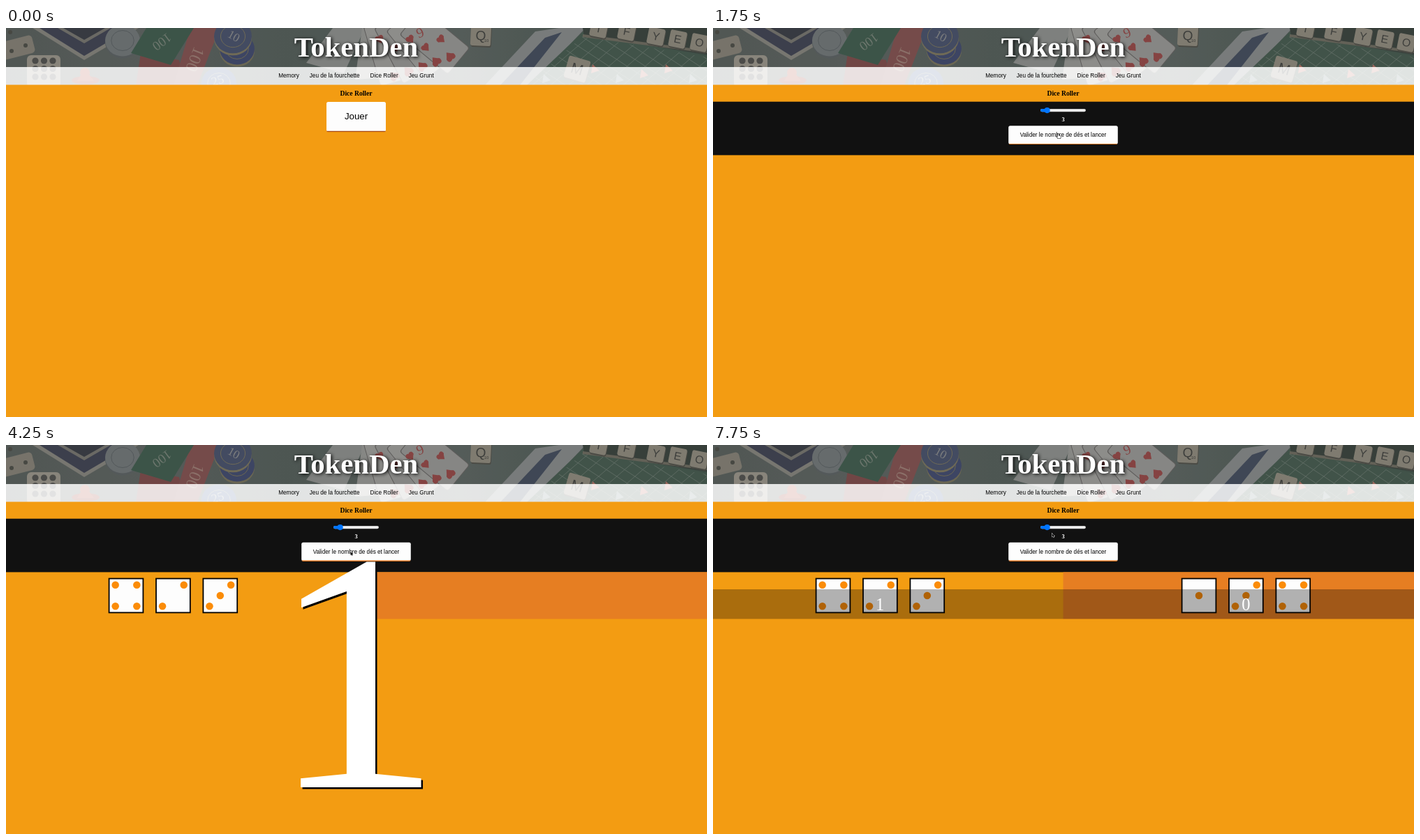
Recreate the animation shown at these times as an HTML page with a canvas. Size 1004x558 px, loop 8000 ms.

```html
<!DOCTYPE html>
<html lang="fr">
<head>
<meta charset="utf-8">
<title>Dice Roller</title>
<style>
html, body { margin: 0; width: 100%; height: 100%; overflow: hidden; background: #f39c12; }
canvas { display: block; }
</style>
</head>
<body>
<canvas id="stage" width="1004" height="558"></canvas>
<script>
const W = 1004, H = 558, LOOP = 8000, MID = 501.5;
const SERIF = '"Liberation Serif", serif', SANS = '"Liberation Sans", sans-serif';
const screen = document.getElementById('stage').getContext('2d');
let c = screen;

function rect(x, y, w, h, fill) {
  c.fillStyle = fill;
  c.fillRect(x, y, w, h);
}
function round(x, y, w, h, r, fill) {
  c.fillStyle = fill;
  c.beginPath();
  c.roundRect(x, y, w, h, r);
  c.fill();
}
function disc(x, y, r, fill, ry = r, turn = 0) {
  c.fillStyle = fill;
  c.beginPath();
  c.ellipse(x, y, r, ry, turn, 0, 7);
  c.fill();
}
function poly(fill, ...p) {
  c.fillStyle = fill;
  c.beginPath();
  for (let i = 0; i < p.length; i += 2) c.lineTo(p[i], p[i + 1]);
  c.closePath();
  c.fill();
}
function text(s, x, y, font, fill) {
  c.font = font;
  c.fillStyle = fill;
  c.textAlign = 'center';
  c.fillText(s, x, y);
}
function at(x, y, turn, draw) {
  c.save();
  c.translate(x, y);
  c.rotate(turn);
  draw();
  c.restore();
}

// Banner: board games on a table, in flat tones
function tile(s, x, y, size, turn) {
  at(x, y, turn, () => {
    round(-size / 2 + 1, -size / 2 + 2, size, size, 3, '#4b4a42');
    round(-size / 2, -size / 2, size, size, 3, '#908b7c');
    text(s, 0, size * .22, `${size * .66}px ${SANS}`, '#393a37');
  });
}
function heart(x, y, s, turn) {
  at(x, y, turn, () => {
    disc(-s * .45, -s * .3, s * .55, '#98403f');
    disc(s * .45, -s * .3, s * .55, '#98403f');
    poly('#98403f', -s, -.1 * s, s, -.1 * s, 0, s * 1.1);
  });
}
function chip(x, y, r, fill, rim) {
  disc(x, y + 3, r, rim, r * .9);
  disc(x, y, r, fill, r * .9);
  c.strokeStyle = rim;
  c.lineWidth = 1;
  c.beginPath();
  c.ellipse(x, y, r * .65, r * .58, 0, 0, 7);
  c.stroke();
}
function photo() {
  const g = c.createLinearGradient(0, 0, W, 0);
  g.addColorStop(0, '#525a56');
  g.addColorStop(.2, '#59605d');
  g.addColorStop(.4, '#4d5954');
  g.addColorStop(.65, '#57615d');
  g.addColorStop(1, '#3a4d43');
  rect(0, 0, W, 82, g);

  at(16, 28, -.25, () => round(-30, -13, 54, 26, 5, '#858074'));
  disc(6, 6, 3, '#45463f');
  disc(8, 33, 3, '#45463f');
  disc(28, 25, 3, '#45463f');
  poly('#85847c', 38, 0, 190, 0, 112, 46);
  poly('#363a4c', 48, 0, 180, 0, 112, 40);
  poly('#74736c', 74, 0, 150, 0, 112, 22);
  poly('#30343d', 82, 0, 142, 0, 112, 17);
  round(30, 39, 48, 46, 6, '#9c978a');
  for (let i = 0; i < 9; i++) disc(42 + i % 3 * 12.5, 47 + (i / 3 | 0) * 11.5, 4.6, '#4a4b48');
  disc(114, 75, 20, '#8f3526', 6);
  disc(113, 64, 7, '#a8402d');
  poly('#a8402d', 109, 64, 117, 64, 126, 76, 102, 76);

  chip(167, 18, 25, '#6e7577', '#565d5f');
  chip(213, 84, 27, '#7b8285', '#60686a');
  poly('#7d4443', 193, 36, 248, 46, 256, 82, 186, 82);
  poly('#834b49', 264, 0, 306, 0, 274, 82, 240, 82);
  poly('#365746', 201, 0, 269, 0, 236, 53, 179, 36);
  at(222, 18, 2.5, () => text('100', 0, 4, `19px ${SERIF}`, '#778478'));
  at(268, 44, 1.95, () => text('100', 0, 5, `24px ${SERIF}`, '#a07c73'));
  chip(331, 30, 25, '#38436a', '#746f55');
  chip(325, 12, 27, '#404a68', '#7a7459');
  at(326, 12, .5, () => text('10', 0, 5, `17px ${SERIF}`, '#8c8e8f'));
  chip(305, 79, 25, '#425f91', '#8b938f');
  at(303, 75, -.3, () => text('25', 0, 6, `18px ${SERIF}`, '#a5aaae'));

  poly('#8e918e', 468, 0, 514, 0, 484, 65, 430, 50);
  poly('#999a97', 510, 0, 552, 0, 560, 70, 500, 74);
  for (let i = 0; i < 4; i++) {
    at(548 + i * 22, 34 - i * 5, -.28 - i * .2, () => {
      round(-25, -45, 50, 90, 4, '#63615f');
      round(-24, -44, 48, 88, 4, i % 2 ? '#999996' : '#a2a29f');
    });
  }
  for (let i = 0; i < 5; i++) {
    heart(535 + i * 22, 16 + i % 2 * 12, 6, -.4 - i * .12);
    heart(556 + i * 20, 69 - i * 7, 7, 2.4);
  }
  at(594, 9, -.4, () => text('9', 0, 4, `20px ${SERIF}`, '#98403f'));

  // Word game board with its rack of tiles
  poly('#868a8a', 686, 82, 758, 5, 792, 0, 830, 0, 752, 82);
  poly('#3a4558', 708, 82, 772, 14, 796, 6, 736, 82);
  poly('#3d5548', 746, 82, 826, 6, 1004, 40, 1004, 82);
  c.save();
  c.beginPath();
  c.moveTo(746, 82);
  c.lineTo(826, 12);
  c.lineTo(1004, 42);
  c.lineTo(1004, 82);
  c.clip();
  c.strokeStyle = '#6b7c70';
  c.lineWidth = .8;
  for (let x = 650; x < 1100; x += 26) {
    c.beginPath();
    c.moveTo(x, 82);
    c.lineTo(x + 95, 0);
    c.moveTo(x, 0);
    c.lineTo(x + 125, 82);
    c.stroke();
  }
  c.restore();
  for (let i = 0; i < 7; i++) {
    const x = 770 + i * 35, y = 72 - i % 3 * 7;
    poly(i % 3 ? '#b97062' : '#768a88', x, y - 6, x + 10, y + 3, x - 2, y + 7);
  }
  poly('#303a34', 826, 0, 1004, 0, 1004, 38, 828, 11);
  poly('#6a685b', 826, 9, 1004, 32, 1004, 36, 826, 13);
  tile('Q', 680, 11, 29, .05);
  text('10', 688, 20, `6px ${SANS}`, '#393a37');
  tile('M', 818, 59, 32, .28);
  [['I', 849, 1], ['F', 889, 5], ['Y', 931, 12], ['E', 962, 16], ['O', 993, 21]]
    .forEach(([s, x, y]) => tile(s, x, y, 24, .2));

  rect(0, 0, W, 56, 'rgba(76,76,76,.25)');
  rect(0, 56, W, 26, 'rgba(255,255,255,.84)');
}
const banner = document.createElement('canvas');
banner.width = W;
banner.height = 82;
c = banner.getContext('2d');
photo();
c = screen;

function header() {
  c.drawImage(banner, 0, 0);
  rect(0, 81.5, W, 1, '#f39c12');
  c.save();
  c.shadowColor = '#000';
  c.shadowOffsetX = c.shadowOffsetY = 1.5;
  c.shadowBlur = 5;
  text('TokenDen', MID, 40.5, `bold 40.8px ${SERIF}`, '#fff');
  c.restore();
  [['Memory', 405], ['Jeu de la fourchette', 470.7], ['Dice Roller', 541.6], ['Jeu Grunt', 594.7]]
    .forEach(([s, x]) => text(s, x, 71.4, `8.2px ${SANS}`, '#000'));
  text('Dice Roller', MID, 97, `bold 9.6px ${SERIF}`, '#000');
}

function button(label, y, w, h, size, base, edge, pressed) {
  const x = MID - w / 2, d = pressed ? .5 : 0, line = pressed ? 1 : 1.6;
  round(x, y + d, w, h - d - line / 2, 2.5, '#fdfdfd');
  c.save();
  c.beginPath();
  c.rect(x, y + h - line, w, line);
  c.clip();
  round(x, y + d, w, h - d, 2.5, edge);
  c.restore();
  text(label, MID, base + d, `${size}px ${SANS}`, '#000');
}

function controls(hover) {
  rect(0, 105.7, W, 76.7, '#111');
  round(469, 116, 65, 4.2, 2.1, '#b2b2b2');
  round(469.5, 116.5, 64, 3.2, 1.6, '#efefef');
  round(469, 116, 11, 4.2, 2.1, '#0075ff');
  disc(478.6, 118.1, 4.1, '#0075ff');
  text('3', MID, 133.8, `bold 8.3px ${SERIF}`, '#fff');
  button('Valider le nombre de dés et lancer', 139.8, 156.6, 27.2, 8.16, 155.6, '#d9701a', hover);
}

// Pip spots: 1 = rising diagonal, 2 = falling diagonal, 4 = centre
const PIPS = { 1: 4, 2: 1, 3: 5, 4: 3 };
function die(x, n, size) {
  const y = 216, h = size / 2, d = size * .303, m = PIPS[n];
  rect(x - h, y - h, size, size, '#000');
  rect(x - h + 1.8, y - h + 1.8, size - 3.6, size - 3.6, '#fdfdfd');
  const pip = (dx, dy) => disc(x + dx, y + dy, size * .104, '#fb8c08');
  if (m & 1) { pip(d, -d); pip(-d, d); }
  if (m & 2) { pip(-d, -d); pip(d, d); }
  if (m & 4) pip(0, 0);
}
const dice = (x, faces, size) => faces.forEach((n, i) => die(x + i * 67.4, n, size));

function bigDigit(s) {
  const font = `490px ${SERIF}`;
  text(s, MID + 2.5, 493.5, font, '#000');
  text(s, MID, 491, font, '#fff');
}

function arrow(x, y) {
  at(x, y, 0, () => {
    c.beginPath();
    [[0, 0], [0, 5.2], [1.3, 4.2], [2.2, 6], [3, 5.6], [2.2, 3.9], [3.8, 3.8]]
      .forEach(p => c.lineTo(...p));
    c.closePath();
    c.lineWidth = 1;
    c.strokeStyle = '#fff';
    c.stroke();
    c.fillStyle = '#000';
    c.fill();
  });
}
function hand(x, y) {
  at(x, y, 0, () => {
    c.beginPath();
    c.roundRect(1.6, 0, 1.4, 5, .7);
    c.roundRect(1.2, 2.6, 4.6, 3.8, 1);
    c.moveTo(1.8, 5.4);
    c.lineTo(0, 3.4);
    c.strokeStyle = '#000';
    c.lineWidth = 1.2;
    c.stroke();
    c.fillStyle = '#fff';
    c.fill();
  });
}
const speck = (x, y) => rect(x, y, 1.1, 1.1, '#999');

// Pointer: start time, shape, x, y
const POINTER = [
  [250, arrow, 511.5, 185.5], [500, hand, 508, 138], [750, hand, 504, 132.5],
  [1000, speck, 506, 132.6], [1500, hand, 499, 151.5], [1750, hand, 492, 152],
  [2250, arrow, 493.5, 153], [5250, hand, 491.5, 152], [6750, hand, 494.5, 161.5],
  [7000, hand, 495, 161.5], [7250, hand, 497, 161], [7500, hand, 496, 160.5],
  [7750, arrow, 485.5, 126.5]
];

function draw(t) {
  const within = (a, b) => t >= a && t < b;
  rect(0, 0, W, H, '#f39c12');
  header();
  if (t < 1000) {
    button('Jouer', 106, 85, 43.3, 13.26, 130.7, '#a8480f', t >= 500);
  } else {
    controls(within(1500, 2250) || within(5250, 7750));
  }
  if (t >= 2250) {
    rect(MID, 182.4, W - MID, 67.1, '#e67e22');
    dice(172, [4, 2, 3], t < 2500 ? 52 : 50.6);
  }
  if (t >= 5250) {
    const settled = t >= 5500;
    dice(696, [1, 3, 4], settled ? 50.6 : 49.4);
    rect(0, 207, W, 42.5, `rgba(0,0,0,${settled ? .3 : .235})`);
    text('1', 239.2, 237, `24.5px ${SERIF}`, '#fff');
    text('0', 763.3, 237, `24.5px ${SERIF}`, '#fff');
  } else if (t >= 2250) {
    bigDigit(t < 3250 ? '3' : t < 4250 ? '2' : '1');
  }
  const p = POINTER.filter(q => q[0] <= t).pop();
  if (p) p[1](p[2], p[3]);
}

const start = performance.now();
function tick() {
  draw((performance.now() - start) % LOOP);
  requestAnimationFrame(tick);
}
tick();
</script>
</body>
</html>
```
